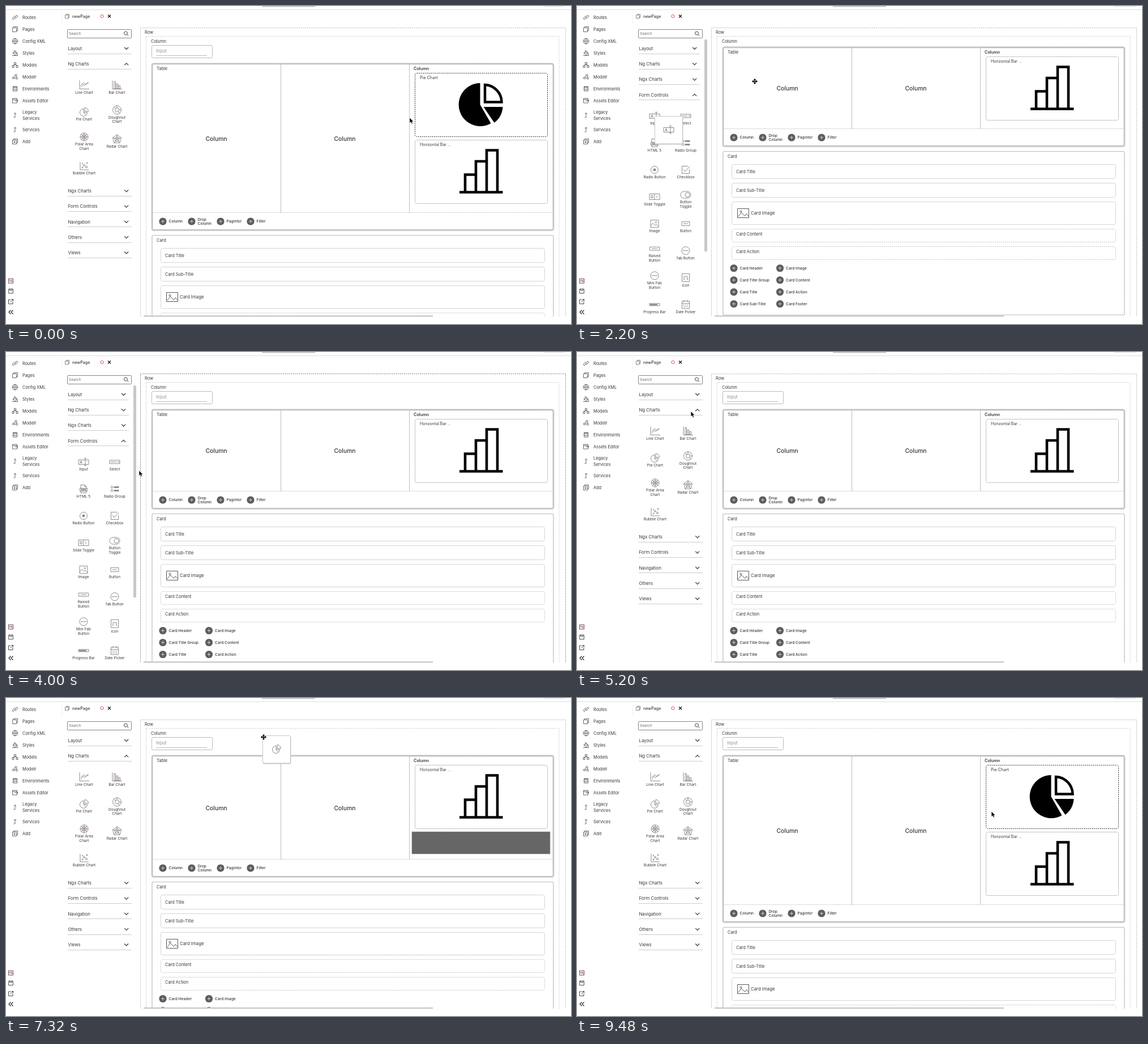
Write an HTML page that moves like this. It is 998 px wide and 561 px high and loops after 9.52 s.

```html
<!DOCTYPE html>
<html lang="en">
<head>
<meta charset="utf-8">
<title>Page builder</title>
<style>
html, body { margin: 0; width: 100%; height: 100%; overflow: hidden; background: #fff; }
svg { display: block; width: 998px; height: 561px; font-family: Inter, "Open Sans", sans-serif; }
</style>
</head>
<body>
<svg id="stage" viewBox="0 0 998 561"></svg>
<script>
const LOOP = 9520, STEP = 40;
const stage = document.getElementById('stage');

// Drawing helpers: each returns SVG markup
const text = (x, y, s, size = 7.4, more = '') =>
  `<text x="${x}" y="${y + size * .36}" font-size="${size}" fill="#3c3638" ${more}>${s}</text>`;
const mid = (x, y, s, size, more = '') => text(x, y, s, size, 'text-anchor="middle" ' + more);
const rect = (x, y, w, h, stroke, more = '') =>
  `<rect x="${x}" y="${y}" width="${w}" height="${h}" fill="none" stroke="${stroke}" ${more}/>`;
const fill = (x, y, w, h, color, more = '') =>
  `<rect x="${x}" y="${y}" width="${w}" height="${h}" fill="${color}" ${more}/>`;
const line = (x1, y1, x2, y2, color = '#ccc', more = '') =>
  `<path d="M${x1} ${y1}L${x2} ${y2}" stroke="${color}" ${more}/>`;
const icon = (x, y, d, width = .7, color = '#655759', more = '') =>
  `<path transform="translate(${x} ${y})" d="${d}" fill="none" stroke="${color}" stroke-width="${width}" ${more}/>`;
const ring = (x, y, r) => `M${x - r} ${y}a${r} ${r} 0 1 0 ${2 * r} 0a${r} ${r} 0 1 0 ${-2 * r} 0`;
const box = (x, y, w, h) => `M${x} ${y}h${w}v${h}h${-w}z`;
const clip = (id, x, y, w, h, body) =>
  `<clipPath id="${id}"><rect x="${x}" y="${y}" width="${w}" height="${h}"/></clipPath><g clip-path="url(#${id})">${body}</g>`;
const dash = 'stroke-dasharray="2 1.5"';
const round = 'rx="3"';

const pieIcon = 'M-1-5.5A6.5 6.5 0 1 0 5.5 1H-1zM-1 1L3.6 5.6M1-7.5A6.5 6.5 0 0 1 7.5-1H1z';
const inputIcon = box(-9, -3.5, 18, 8) + 'M3-6.5V6.5M1-6.5H5M1 6.5H5M-6.5 3l2-5 2 5M-6 1h3';
const frameIcon = box(-7, -6.5, 14, 13) + 'M-7 4l4-5 4 4 2-2 4 4' + ring(2.5, -2.5, 1.3);
const buttonIcon = box(-7, -3.5, 14, 7) + 'M-4 0H4';
const fabIcon = ring(0, 0, 7) + 'M-5 0H5';

const ngItems = [
  ['Line Chart', 'M-8-8V7H9M-6 4l4-5 3 2 6-6M-6 1l5-5 4 3 5-3'],
  ['Bar Chart', 'M-8-8V7H9' + box(-5, -6, 2.5, 13) + box(-1, -2, 2.5, 9) + box(3, 1, 2.5, 6)],
  ['Pie Chart', pieIcon],
  ['Doughnut|Chart', ring(0, 0, 7.5) + ring(0, 0, 3.5) + 'M0-7.5v4M7.5 0h-4M-5-5l3 3M2 3l3 3'],
  ['Polar Area|Chart', ring(0, 0, 7) + ring(0, 0, 4) + 'M-7 0H7M0-7V7M-5-5L5 5M5-5L-5 5'],
  ['Radar Chart', 'M0-7.5L7.5-2 5 7H-5L-7.5-2zM0-4L4-1 2.5 4H-2.5L-4-1zM0-7.5V0L7.5-2M0 0L5 7M0 0L-5 7M0 0L-7.5-2'],
  ['Bubble Chart', 'M-7-7V7H8' + ring(-3, 3, 1) + ring(0, -1, 1.4) + ring(4, 2, 1.6) + ring(5, -5, 1) + ring(-3, -4, .7)]
];
const formItems = [
  ['Input', inputIcon],
  ['Select', box(-9, -3, 18, 6) + 'M-7 0H3M5-1l1.5 2L8-1'],
  ['HTML 5', 'M-5-1V-7H2L5-4V-1M2-7v3h3M-5 4V7H5V4' + box(-6.5, -1, 13, 5) + 'M-5 1.5H5M-5 .5H5M-5 2.5H5'],
  ['Radio Group', ring(-5, -3, 1.8) + ring(-5, 3, 1.8) + 'M-1-4H7V-2H-1zM-1 2H7V4H-1zM-1-3H7M-1 3H7'],
  ['Radio Button', ring(0, 0, 6.5) + ring(0, 0, 2) + ring(0, 0, 1.4) + ring(0, 0, .7)],
  ['Checkbox', 'M6.5-1V6.5H-6.5V-6.5H4M-4-1L-1 3 7-6'],
  ['Slide Toggle', box(-9, -5, 18, 10) + 'M0-5V5M-6-2v4h3v-4zM4-2v4'],
  ['Button|Toggle', 'M-3-6H3A6 6 0 0 1 3 6H-3A6 6 0 0 1-3-6' + ring(3, 0, 4)],
  ['Image', frameIcon],
  ['Button', buttonIcon],
  ['Raised|Button', box(-8.5, -3, 17, 6) + 'M-5 0H5'],
  ['fab Button', fabIcon],
  ['Mini Fab|Button', fabIcon],
  ['icon', box(-6.5, -7, 13, 14) + 'M-3 3V-2H3V3M-4 3h2M2 3h2'],
  ['Progress Bar', box(-9, -2, 18, 4) + 'M-8-.6H5M-8 0H5M-8 .6H5'],
  ['Date Picker', box(-6.5, -6, 13, 13) + 'M-6.5-2H6.5M-3-8v3M3-8v3M-4 1h2M-1 1h2M2 1h2M-4 4h2M-1 4h2M2 4h2']
];

const arrowUp = 'M-2.5 4H0V-4M-2-2L0-4 2-2';
const pages = box(-4.5, -2.5, 7, 7) + 'M-2.5-2.5V-4.5H4.5V2.5H2.5';
const menu = [
  ['Routes', 20, 'M-1 1L3-4 5-2 0 3M1-1L-3 4-5 2 0-3'],
  ['Pages', 41, pages],
  ['Config XML', 62, ring(0, 0, 4.8) + 'M-4.8 0H4.8M0-4.8Q-4 0 0 4.8Q4 0 0-4.8'],
  ['Styles', 83, 'M-4 0L0-4 4 0 0 4zM-2-5L1-1M-4 0H4M4 1v3M-5 4.5h10'],
  ['Models', 104, box(-1.5, -4.5, 3, 3) + box(-5, 1.5, 3, 3) + box(2, 1.5, 3, 3) + 'M-3.5 1.5V0H3.5V1.5M0-1.5V0'],
  ['Modelr', 125, ring(-3, 2, 1.6) + ring(3, 2.5, 1.6) + ring(1.5, -3, 1.6) + 'M-2 .5L0-2M2-1.5L3 1M-1.4 2H1.4'],
  ['Environments', 146, 'M-3.5-4H3.5V4H-3.5zM-3.5-1.5H3.5M-3.5 1.5H3.5M-3-3.5H3'],
  ['Assets Editor', 167, box(-4.5, -4, 8, 8) + 'M-1 0H5M3-2l2 2-2 2M-4.5-2H3'],
  ['Legacy', 187.5], ['Services', 198],
  ['', 192.5, arrowUp],
  ['Services', 218, arrowUp],
  ['Add', 239, pages + 'M-1-1V3M-3 1H1']
];

function shell() {
  let s = line(0, 6.5, 998, 6.5, '#ddd') + fill(452, 0, 94, 1.5, '#bbb') + fill(949, 0, 38, 1, '#ddd')
    + line(98.5, 9, 98.5, 32, '#f0f0f0');
  for (const [name, y, d] of menu) s += text(29, y, name) + (d ? icon(16, y, d, .8, '#444') : '');
  s += icon(8.5, 485, box(-4, -4, 8, 8), .9, '#634') + mid(8.5, 485, 'TS', 4.5, 'font-weight="700"')
    + icon(8.5, 503, box(-3.8, -3.8, 7.6, 7.6) + 'M-2-3.8V-1.5H2V-3.8', .9, '#333')
    + icon(8.5, 521.5, 'M0-3.5H-4V4H3.5V0M1-4H4V-1M4-4L-1 1', .9, '#333')
    + icon(8.5, 540, 'M0-3.5L-3.5 0 0 3.5M4-3.5L.5 0 4 3.5', 1.2, '#222');
  s += icon(108, 18, box(-3.5, -2, 5.5, 6) + 'M-1.5-2V-3.5H3.5V2.5H2') + text(117, 18, 'newPage', 7.1, 'font-weight="500"')
    + icon(169.5, 18, ring(0, 0, 2.6), .9, '#d33') + icon(182.5, 18, 'M-2.5-2.5L2.5 2.5M2.5-2.5L-2.5 2.5', 1.2, '#111');
  return s + rect(108.5, 41.5, 113, 15, '#777', 'rx="1" stroke-width=".9"') + text(111, 49, 'Search', 6.5, 'opacity=".75"')
    + icon(212, 48.5, ring(-.5, -.5, 3) + 'M1.7 1.7L4.5 4.5', .9, '#333');
}

const ease = p => (p = Math.max(0, Math.min(1, p)), p * p * (3 - 2 * p));
const NG_OPEN = 4450, FORM_OPEN = 850, RESET = 40;

function panel(id, items, top, height, x1, x2) {
  if (height < 1) return '';
  const cells = items.map(([name, d], i) => {
    const x = i % 2 ? x2 : x1, y = top + 43.5 + 47.55 * (i >> 1), words = name.split('|');
    const dy = words.length > 1 ? 3.5 : 0;
    return icon(x, y - 6.5 - dy, d) + words.map((w, k) => mid(x, y + 6.5 - dy + 7.5 * k, w, 6.5)).join('');
  }).join('');
  return clip(id, 100, top + 10, 132, height, cells);
}

function palette(t) {
  const swap = ease((t - NG_OPEN) / 225);
  const ng = t < RESET ? 1 : swap, form = t < RESET ? 0 : ease((t - FORM_OPEN) / 225) * (1 - swap);
  const narrow = form > .5, right = narrow ? 217 : 222;
  let y = 75, s = '';
  for (const name of ['Layout', 'Ng Charts', 'Ngx Charts', 'Form Controls', 'Navigation', 'Others', 'Views']) {
    const open = { 'Ng Charts': ng, 'Form Controls': form }[name] || 0;
    const under = Math.floor(y + 9) + .5;
    s += text(109.5, y, name, 7.8) + line(109, under, right, under)
      + icon(right - 9.3, y, open > .5 ? 'M-3.5 2L0-1.5 3.5 2' : 'M-3.5-2L0 1.5 3.5-2', 1.2, '#333');
    if (name === 'Ng Charts') s += panel('ng', ngItems, y, ng * 197, 138, 196);
    if (name === 'Form Controls') s += panel('form', formItems, y, form * 430, 137, 192);
    y += 27.3 + open * (name === 'Ng Charts' ? 196.7 : 430);
  }
  if (narrow) s += fill(225, 59, 5, 374, '#c8c8c8', 'rx="1.5"');
  return clip('palette', 100, 58, 133, 488, s);
}

function plus(x, y, label) {
  const words = label.split('|');
  return `<circle cx="${x}" cy="${y}" r="6.6" fill="#5f5b5c"/>` + icon(x, y, 'M-3 0H3M0-3V3', .9, '#ddd')
    + words.map((w, i) => text(x + 10.5, y + (i - (words.length - 1) / 2) * 7.6, w, 6.7, 'font-weight="500"')).join('');
}

const barArt = 'M-38.5 38H38M-28.5 36V7H-9.5V36M-9.5 36V-16.5H9.5V36M9.5 36V-36H28.5V36';
const pieArt = `<path d="M-2-38A38 38 0 1 0 17 33L-2 0zM4 4H38A38 38 0 0 1 23 32z"/>`
  + icon(0, 0, 'M6.5-35A31 31 0 0 1 36-4.5H6.5z', 4.5, '#000');

function chart(y, pie) {
  return rect(722.5, y + .5, 234, 112, pie ? '#333' : '#c4c4c4', pie ? round + dash : round)
    + text(731, y + 8.5, pie ? 'Pie Chart' : 'Horizontal Bar ...', pie ? 7.3 : 7)
    + (pie ? `<g transform="translate(839.5 ${y + 56})">${pieArt}</g>` : icon(839.5, y + 54.5, barArt, 4.6, '#000'));
}

const slot = (x, y, w) => fill(x, y, w, 39, '#666') + rect(x, y, w, 39, '#888', dash);

function table(top, pie, gap) {
  const h = pie ? 263 : gap ? 183 : 144, b = top + h;
  let s = rect(258, top, 709, h + 30.5, '#d0d0d0', 'stroke-width="3" rx="3"')
    + rect(258.5, top - .5, 708, h + 30, '#b4b4b4', 'stroke-width=".8" rx="2"')
    + line(259, b - .5, 712, b - .5, '#ddd') + line(485.5, top, 485.5, b, '#bbb') + line(712.5, top, 712.5, b, '#ccc')
    + rect(712.5, top + .5, 254, h - 1, '#b4b4b4', dash + ' stroke-width=".8"')
    + text(266, top + 8, 'Table') + text(720, top + 8.5, 'Column', 7.3, 'font-weight="600"')
    + mid(371.5, top + h / 2 + .3, 'Column', 10.4, 'font-weight="500"')
    + mid(598.5, top + h / 2 + .3, 'Column', 10.4, 'font-weight="500"')
    + plus(277, b + 15, 'Column') + plus(328, b + 15, 'Drop|Column') + plus(379, b + 15, 'Pagintor') + plus(432, b + 15, 'Filter');
  if (pie) s += chart(top + 16, true);
  s += chart(top + (pie ? 134 : gap === 'top' ? 55 : 16), false);
  if (gap) s += slot(717, top + (gap === 'top' ? 10 : 134), 244);
  return s + card(b + 39.5);
}

function card(y) {
  let s = rect(258, y, 709, 288.5, '#bbb', 'stroke-width="1.2" rx="2"') + text(266, y + 8.7, 'Card');
  for (const [name, dy, h, style] of [['Title', 23, 25, ''], ['Sub-Title', 56, 25, ''], ['Content', 137, 23, dash], ['Action', 168, 23, dash]])
    s += rect(273.5, y + dy, 678, h, style ? '#c4c4c4' : '#d4d4d4', round + style)
      + text(281, y + dy + (style ? 8.5 : 12.5), 'Card ' + name);
  s += rect(273.5, y + 89, 678, 40, '#d4d4d4', round) + text(307, y + 108.8, 'Card Image', 7.8)
    + icon(293.5, y + 109, box(-10, -8, 20, 16) + 'M-9 6L-3-1 3 5 6 1 9 5' + ring(-4, -3, 1.5), .9, '#444');
  ['Header', 'Image', 'Title Group', 'Content', 'Title', 'Action', 'Sub-Title', 'Footer'].forEach((name, i) => {
    s += plus(i % 2 ? 358.5 : 277, y + 206 + 21 * (i >> 1), 'Card ' + name);
  });
  return s;
}

// Events of the session, in ms
const drags = [{ from: 2080, to: 3050, art: inputIcon }, { from: 6480, to: 8800, art: pieIcon }];
const between = (t, a, b) => t >= a && t < b;

function page(t, cursor) {
  const reset = t < RESET, input = reset || t >= 3050, pie = reset || t >= 8800;
  const inputSlot = between(t, 2400, 3050);
  const gap = between(t, 6850, 8150) ? 'bottom' : between(t, 8150, 8800) ? 'top' : '';
  const hot = between(cursor.x, 233, 247);
  let s = rect(237.5, 38.5, 751, 600, hot ? '#777' : '#b0b0b0', dash + ' stroke-width=".9"') + text(245, 46.5, 'Row')
    + rect(247.5, 53.5, 729.5, 600, '#c0c0c0', dash + ' stroke-width=".8"') + text(256, 62, 'Column');
  if (input) s += rect(257.5, 69.5, 107, 22, '#bbb', 'rx="2"') + text(265, 79, 'Input', 7.8, 'opacity=".55"') + line(265, 87.5, 355, 87.5, '#bbb');
  if (inputSlot) s += slot(252, 67, 720);
  s += table(input ? 102 : inputSlot ? 112 : 73, pie, gap) + fill(243, 546, 511, 2, '#c4c4c4');
  return clip('page', 232, 20, 766, 528, s);
}

const path = [
  [40, 430, 250], [700, 195, 159], [900, 195, 157], [1500, 139, 197], [2080, 139, 197], [2200, 314, 133],
  [2500, 400, 85], [3050, 420, 82], [3400, 410, 95], [4000, 235, 209], [4400, 205, 103], [4840, 205, 103],
  [5360, 200, 105], [5520, 200, 105], [5840, 185, 114], [6300, 139, 187], [6480, 139, 187], [6900, 740, 255],
  [7200, 455, 69], [7320, 455, 69], [8360, 757, 144], [8480, 757, 144], [8800, 790, 165], [9200, 770, 190],
  [9480, 732, 200], [9520, 713, 197]
];

function pointer(t) {
  if (t < RESET) return { x: 713, y: 197 };
  const i = path.findIndex(k => k[0] > t), [a, ax, ay] = path[i - 1], [b, bx, by] = path[i];
  const p = ease((t - a) / (b - a));
  return { x: ax + (bx - ax) * p, y: ay + (by - ay) * p };
}

function pointerArt(t, { x, y }) {
  const drag = drags.find(d => between(t, d.from, d.to));
  if (!drag) return `<path transform="translate(${x} ${y})" d="M0 0V9.5L2.1 7.6 3.7 11 5.4 10.2 3.9 7H6.8z" stroke="#fff" stroke-width=".6"/>`;
  const lag = pointer(t - 120), gx = lag.x - 1.5, gy = lag.y - 2.5;
  const cross = 'M-4 0H4M0-4V4M-2.5-1.5L-4 0-2.5 1.5M2.5-1.5L4 0 2.5 1.5M-1.5-2.5L0-4 1.5-2.5M-1.5 2.5L0 4 1.5 2.5';
  return fill(gx, gy + 1, 50, 49, '#ccc', 'rx="2"') + fill(gx, gy, 49, 48.5, '#fff', 'rx="2" stroke="#bbb" stroke-width=".8"')
    + icon(gx + 24.5, gy + 23.5, drag.art) + icon(x, y, cross, 2.4, '#fff') + icon(x, y, cross, 1.4, '#000');
}

const fixed = shell();
let last = -1;
function draw() {
  const t = Math.floor(performance.now() % LOOP / STEP) * STEP;
  if (t !== last) {
    const cursor = pointer(t);
    stage.innerHTML = fixed + palette(t) + page(t, cursor) + pointerArt(t, cursor);
    last = t;
  }
  requestAnimationFrame(draw);
}
draw();
</script>
</body>
</html>
```
